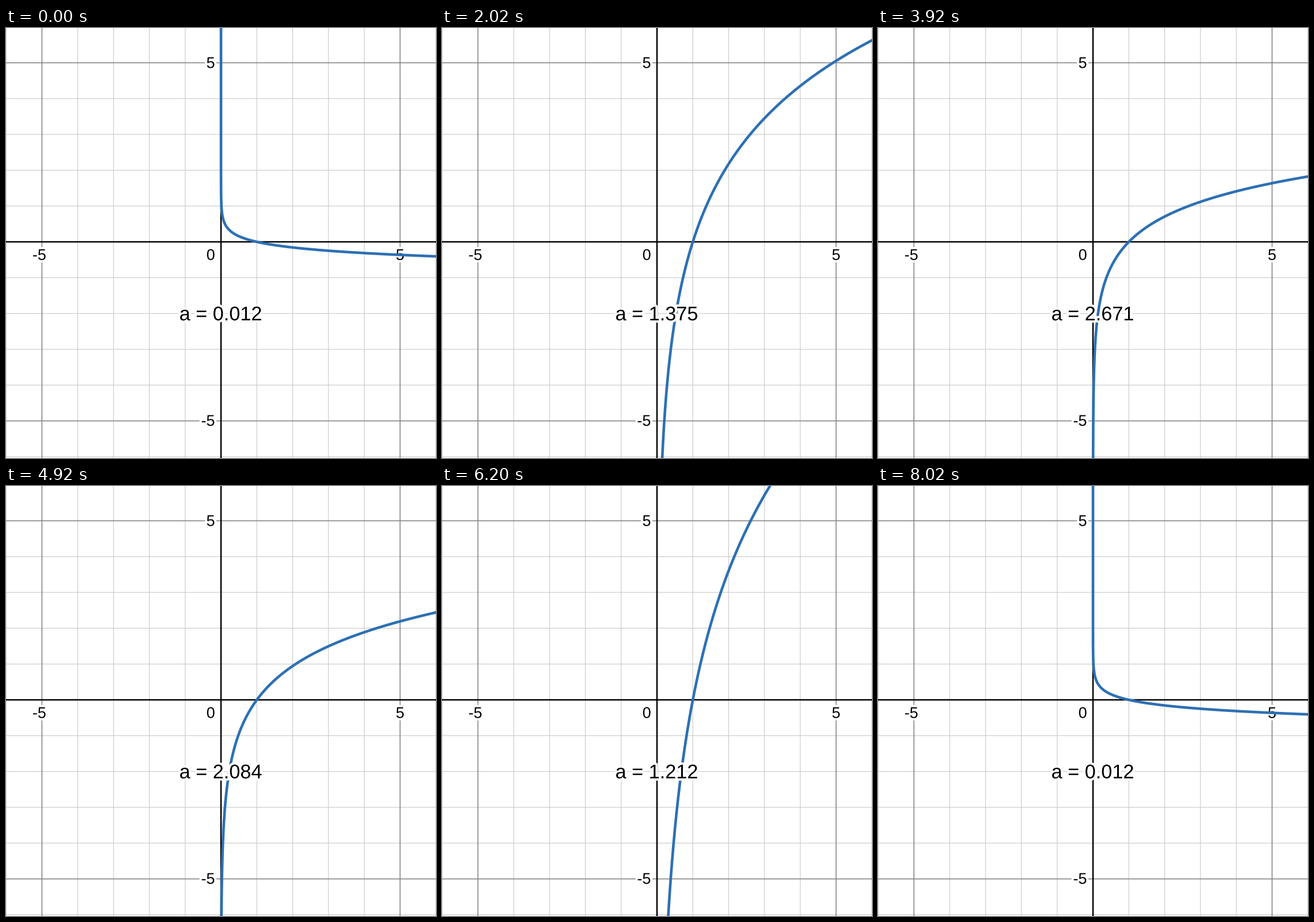
A matplotlib script for the animation above (8.04 s loop, 748 px wide and 748 px high).

```python
import numpy as np
import matplotlib.pyplot as plt
from matplotlib import patheffects
from matplotlib.animation import FuncAnimation

SIZE, DPI = 748, 100
PT = 72 / DPI                 # points per pixel
CX, CY, UNIT = 374, 372, 62.3
STEP, FRAMES = 20, 402

# Slider sweep: almost steady up to e and back, as (ms, a)
SWEEP = [(0, 0.012), (820, 0.563), (1200, 0.815), (2960, 2.017),
         (3989, 2.718), (4100, 2.637), (4120, 2.637), (4920, 2.084),
         (6200, 1.212), (7220, 0.522), (8020, 0.012)]
TIMES, VALUES = zip(*SWEEP)

plt.rcParams["font.family"] = "Liberation Sans"
fig = plt.figure(figsize=(SIZE / DPI, SIZE / DPI), dpi=DPI, facecolor="white")
ax = fig.add_axes([0, 0, 1, 1])
ax.set_xlim(0, SIZE)
ax.set_ylim(SIZE, 0)
ax.axis("off")


def rule(k, color, width, z):
    """Draw the vertical and horizontal line at grid unit k."""
    x, y = CX + k * UNIT, CY - k * UNIT
    style = dict(color=color, lw=width * PT, zorder=z, snap=False)
    ax.plot([x, x], [0, SIZE], **style)
    ax.plot([0, SIZE], [y, y], **style)


def label(x, y, text, size, ha, z):
    """Text on a baseline with a white halo."""
    halo = patheffects.withStroke(linewidth=8 * PT, foreground="white")
    return ax.text(x, y, text, fontsize=size * PT, ha=ha, va="baseline",
                   color="black", zorder=z, path_effects=[halo])


for k in range(-6, 7):
    if k == 0:
        rule(k, "black", 2.5, 3)
    elif k % 5 == 0:
        rule(k, "#7c7c7c", 1.5, 2)
    else:
        rule(k, "#cccccc", 1.2, 1)

label(363.5, 69.5, "5", 27, "right", 4)
label(363.5, 692, "-5", 27, "right", 4)
label(363.5, 403.5, "0", 27, "right", 4)
label(58, 403.5, "-5", 27, "center", 4)
label(685.5, 403.5, "5", 27, "center", 4)

curve, = ax.plot([], [], color="#2d70b3", lw=4.6 * PT, zorder=5)
readout = label(301.5, 508.5, "", 34.3, "left", 6)

ys = np.linspace(-6.3, 6.3, 1200)


def draw(i):
    a = np.interp(i * STEP, TIMES, VALUES)
    # y = log_a(x), traced as x = a ** y
    xs = np.exp(np.minimum(ys * np.log(a), 3))
    curve.set_data(CX + UNIT * xs, CY - UNIT * ys)
    readout.set_text(f"a = {a:.3f}")
    return curve, readout


anim = FuncAnimation(fig, draw, frames=FRAMES, interval=STEP,
                     repeat=True, repeat_delay=0, blit=False)
plt.show()
```
